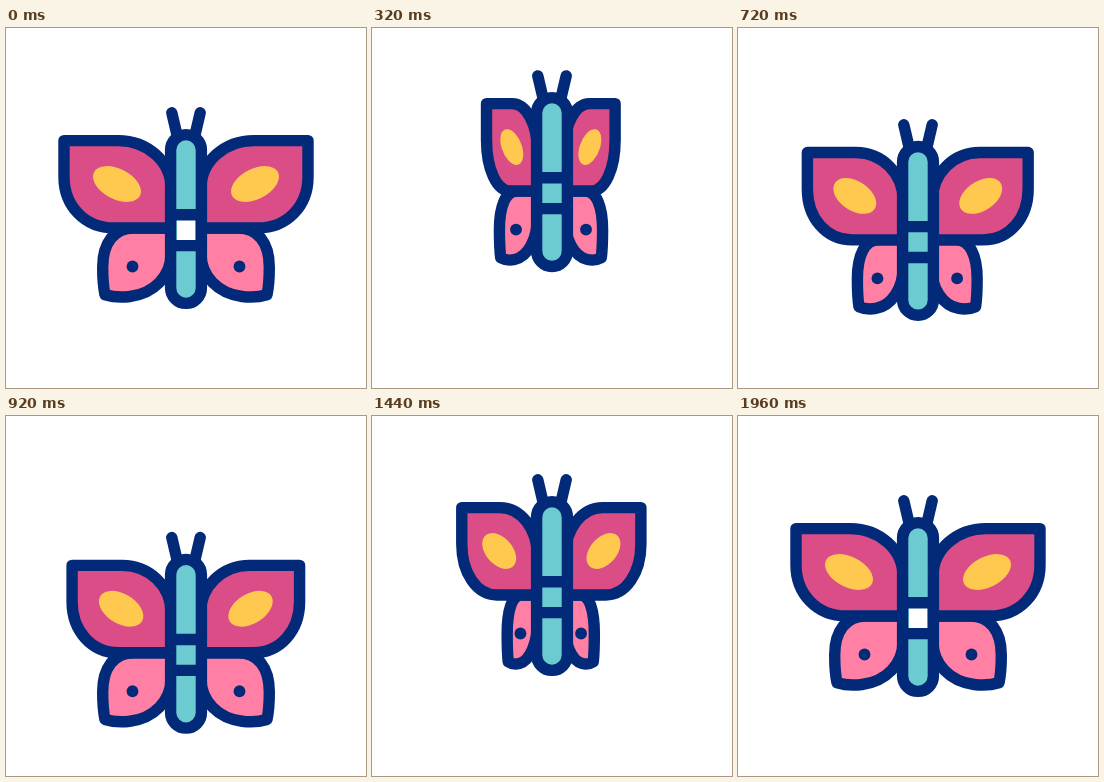
Write an HTML page that moves like this. It is 360 px wide and 360 px high and loops after 2 s.

```html
<!DOCTYPE html>
<html lang="en">
<head>
<meta charset="utf-8">
<title>Butterfly</title>
<style>
  html, body { margin: 0; width: 100%; height: 100%; overflow: hidden; background: #fff; }
  svg { display: block; width: 100%; height: 100%; }
  .line { stroke: #022a78; stroke-width: 11.4; stroke-linecap: round; stroke-linejoin: round; }
  .upper { fill: #da4d87; }
  .lower { fill: #ff80a4; }
  .spot { fill: #ffc94f; }
  .dot { fill: #022a78; }
  .body { fill: #6bcbd1; }
</style>
</head>
<body>
<svg viewBox="0 0 360 360">
  <g id="butterfly">
    <g id="left"></g>
    <g id="right" transform="translate(360 0) scale(-1 1)"></g>
    <path class="line" fill="none" d="M165.8,84.8 L171,107 M194.2,84.8 L189,107"/>
    <rect class="line body" x="164.6" y="106.6" width="30.8" height="168.8" rx="15.4"/>
    <rect id="segment" x="171" y="190" width="18" height="24" fill="#fff"/>
    <path class="line" fill="none" d="M164.6,186.7 H195.4 M164.6,217.6 H195.4"/>
  </g>
</svg>
<script>
const LOOP = 2000;
const UPPER = "M58,112.6 L112,112.6 C142,112.6 165,134 165,160 L165,200 L108,200 C79,200 58,178 58,149 Z";
const LOWER = "M165,200 L128,200 C108,200 96.7,215 96.7,239 C96.7,250 97.5,260 99,266.8 " +
  "C107,269.2 116,269.5 124,268.5 C148,265.5 165,248 165,226 Z";

// Keys are [time, value, optional time warp for the segment that ends there].
const LIFT = [[0, 0], [420, -43], [900, 37], [1440, -21], [1960, 0, 0.7]];
const UPPER_OPEN = [[0, 1], [415, 0.398], [832, 1], [1236, 0.398], [1640, 1]];
const LOWER_OPEN = [[66, 1], [502, 0.292], [919, 1], [1330, 0.292], [1700, 1]];

const el = id => document.getElementById(id);
const smooth = u => u * u * (3 - 2 * u);

function valueAt(keys, t) {
  if (t <= keys[0][0]) return keys[0][1];
  for (let i = 1; i < keys.length; i++) {
    const [t0, a] = keys[i - 1];
    const [t1, b, warp = 1] = keys[i];
    if (t < t1) return a + (b - a) * smooth(((t - t0) / (t1 - t0)) ** warp);
  }
  return keys[keys.length - 1][1];
}

// Wings fold sideways towards their hinge while outlines keep their weight.
function wings(hinge, upper, lower) {
  const fold = (x, open) => (hinge + (x - hinge) * open).toFixed(2);
  const foldPath = (d, open) => d.replace(/([\d.]+),/g, (_, x) => fold(+x, open) + ",");
  return `
    <path class="line lower" d="${foldPath(LOWER, lower)}"/>
    <circle class="dot" cx="${fold(126.5, lower)}" cy="238.5" r="5.9"/>
    <path class="line upper" d="${foldPath(UPPER, upper)}"/>
    <ellipse class="spot" rx="25.8" ry="15.2"
      transform="translate(${fold(111, upper)} 156) scale(${upper} 1) rotate(27)"/>`;
}

function draw(t) {
  const upper = valueAt(UPPER_OPEN, t);
  const lower = valueAt(LOWER_OPEN, t);
  el("butterfly").setAttribute("transform", `translate(0 ${valueAt(LIFT, t).toFixed(2)})`);
  el("left").innerHTML = wings(166, upper, lower);
  el("right").innerHTML = wings(170.5, upper, lower);
  // The middle segment is white only while at rest.
  el("segment").setAttribute("visibility", t < 40 || t >= 1955 ? "visible" : "hidden");
}

const start = performance.now();
function frame() {
  draw((performance.now() - start) % LOOP);
  requestAnimationFrame(frame);
}
draw(0);
requestAnimationFrame(frame);
</script>
</body>
</html>
```
